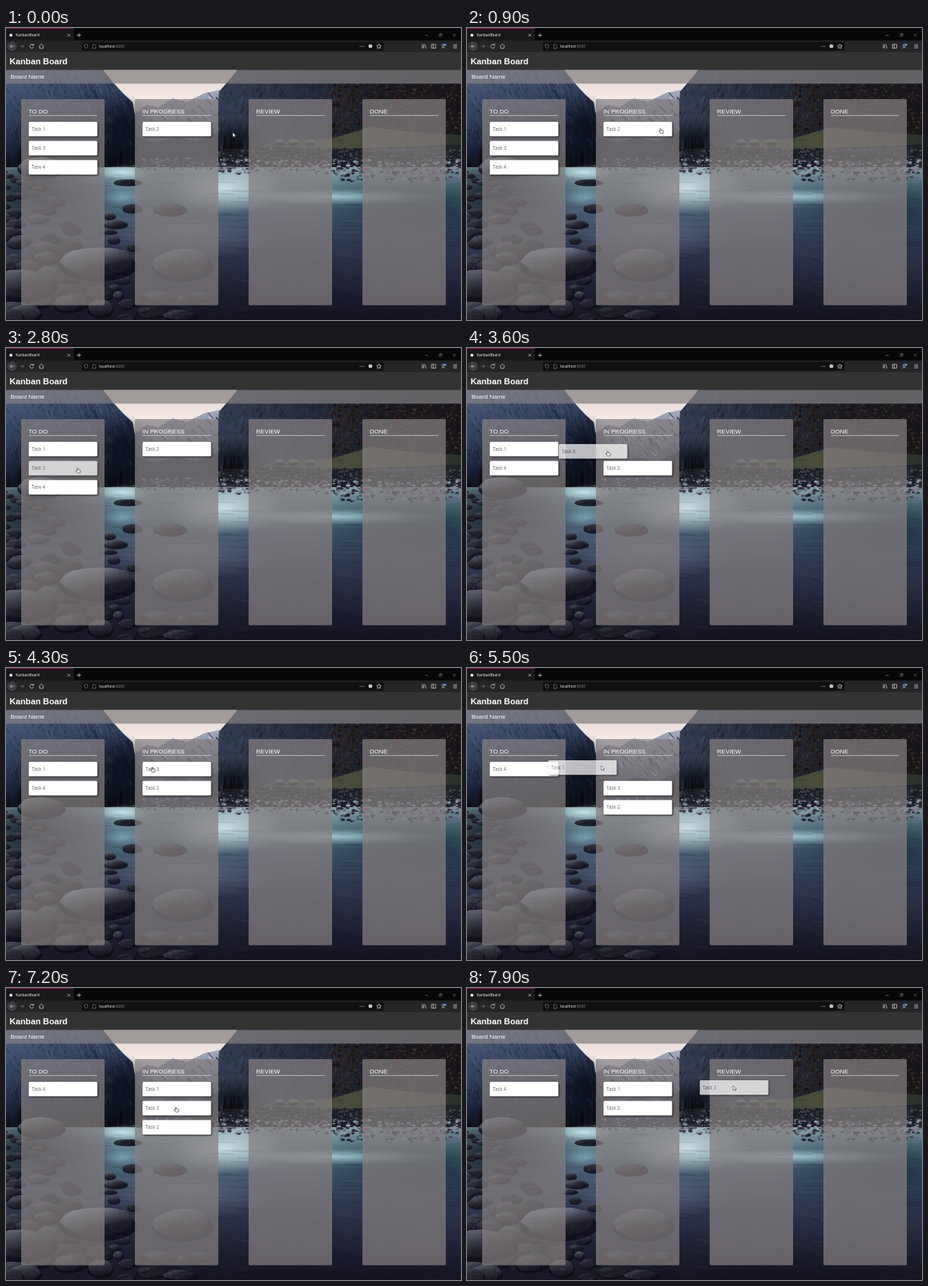
Write an HTML page with a canvas that moves like this. It is 600x386 px and loops after 8 s.

```html
<!DOCTYPE html>
<html lang="en">
<head>
<meta charset="utf-8">
<title>KanbanBoard</title>
<style>
  html, body { margin: 0; width: 100%; height: 100%; overflow: hidden; background: #0b0b0d; }
  canvas, svg { position: absolute; left: 0; top: 0; width: 600px; height: 386px; }
  text { fill: #fff; font-family: "Liberation Sans", Arial, sans-serif; font-size: 8px; }
  .small { font-family: "Open Sans", sans-serif; font-size: 4.9px; }
  .task text { font-family: "Open Sans", sans-serif; font-size: 6.2px; fill: #666; }
  .task { filter: drop-shadow(1.3px 1.5px 1px rgba(0, 0, 0, .75)); }
  .icon { fill: none; stroke: #c6c6c9; stroke-width: .8; }
  .dim { stroke: #88888c; stroke-width: .6; }
</style>
</head>
<body>
<canvas id="photo" width="600" height="386"></canvas>
<svg viewBox="0 0 600 386">
  <rect width="600" height="17" fill="#060607"/>
  <rect width="89.5" height="17" fill="#18181a"/>
  <rect width="89.5" height="1" fill="#8c143c"/>
  <rect y="16.5" width="600" height="16" fill="#242427"/>
  <rect x="100" y="18.5" width="398" height="11.5" rx="1" fill="#101012"/>
  <circle cx="6.5" cy="9.5" r="2" fill="#eee"/>
  <text class="small" x="13" y="11.4">KanbanBoard</text>
  <text class="small" x="123" y="26">localhost<tspan fill="#98989c">:4200</tspan></text>
  <circle cx="8" cy="24.2" r="5.6" fill="#3d3d41" stroke="#606064" stroke-width=".5"/>
  <g class="icon">
    <path d="M81 7.7l3.6 3.6m0-3.6l-3.6 3.6M93.500 9.500h5.400m-2.700-2.700v5.400"/>
    <path d="M5.500 24.200h5m-2.700-2.300l-2.300 2.300 2.300 2.300"/>
    <path class="dim" d="M18.500 24.200h5m-2.300-2.300l2.300 2.300-2.300 2.300"/>
    <path d="M36 22.500a2.600 2.600 0 1 0 .5 2.500m0-4.200v2.200h-2.200"/>
    <path d="M43.400 24.200l3.300-3 3.300 3m-5.500-.2v3h4.400v-3"/>
    <path class="dim" d="M105.500 21.400l2.300.8q0 3.500-2.300 5-2.300-1.500-2.300-5zM114.600 21.500h2.500l1.200 1.300v4.200h-3.700z"/>
    <path d="M466.600 24.200h6" stroke-width="1" stroke-dasharray="1 1.400"/>
    <path d="M491.700 21.200l.9 2 2.200.2-1.700 1.500.5 2.200-1.900-1.200-1.900 1.200.5-2.200-1.700-1.500 2.200-.2z"/>
    <path d="M549 21.500v5.500m1.800-5.500v5.500m1.600-5.400l1.700 5.400M561 21.700h5.600v5h-5.600zm2.300 0v5"/>
    <circle cx="576.500" cy="23" r="1.500"/><path d="M573.800 27q2.700-3.600 5.400 0"/>
    <path d="M589.800 22.300h5m-5 2h5m-5 2h5"/>
    <path class="dim" d="M552.500 9.700h4M571 8.300h2.800v2.800h-2.800zm1 0v-1h2.800v2.800h-1M589.400 7.700l3.600 3.600m0-3.600l-3.600 3.600"/>
  </g>
  <circle cx="480.500" cy="24" r="2.500" fill="#c9c9cc"/>
  <circle cx="579" cy="22" r="1.500" fill="#38a9e8"/>
  <rect y="32" width="600" height="23.500" fill="#333"/>
  <rect y="55.500" width="600" height="18" fill="#858284" opacity=".7"/>
  <text x="4.700" y="48" style="font-size:11.200px;font-weight:700">Kanban Board</text>
  <text x="6" y="67.300">Board Name</text>
  <g id="columns"></g>
  <g id="tasks"></g>
  <g id="arrow"><path transform="scale(.75)" d="M0 0V8.200L1.900 6.500 3.200 9.300 4.500 8.700 3.200 6H5.800Z" fill="#fff" stroke="#222" stroke-width=".7"/></g>
  <g id="hand"><path transform="translate(0 1) scale(.75)" d="M-.9 .8Q0-.6.8.8V3.400L4.200 4.200Q5.300 4.600 5 6L4.300 9H-.5L-3 5.600Q-3.200 4.300-2 4.700L-.9 5.700Z" fill="#fff" stroke="#222" stroke-width=".8"/></g>
</svg>
<script>
const byId = id => document.getElementById(id);
const ctx = byId('photo').getContext('2d');
let seed = 7;
const rnd = (a, b) => {
  seed = (seed * 16807) % 2147483647;
  return a + (b - a) * seed / 2147483647;
};
const times = (n, fn) => { for (let i = 0; i < n; i++) fn(i); };
const grey = (lo, hi, alpha = 1) => {
  const v = rnd(lo, hi);
  return `rgba(${v},${v * 1.03},${v * 1.14 + 4},${alpha})`;
};

// evenly spaced colours from (x0, y0) to (x1, y1)
function ramp(x0, y0, x1, y1, ...colors) {
  const g = ctx.createLinearGradient(x0, y0, x1, y1);
  colors.forEach((c, i) => g.addColorStop(i / (colors.length - 1), c));
  return g;
}
function shape(points, fill) {
  const path = new Path2D(`M${points}Z`);
  ctx.fillStyle = fill;
  ctx.fill(path);
  return path;
}
function blob(x, y, rx, ry, fill) {
  ctx.fillStyle = fill;
  ctx.beginPath();
  ctx.ellipse(x, y, rx, ry, 0, 0, 7);
  ctx.fill();
}
function glow(x, y, rx, ry, rgb, alpha) {
  ctx.save();
  ctx.translate(x, y);
  ctx.scale(rx, ry);
  const g = ctx.createRadialGradient(0, 0, 0, 0, 0, 1);
  g.addColorStop(0, `rgba(${rgb},${alpha})`);
  g.addColorStop(1, `rgba(${rgb},0)`);
  ctx.fillStyle = g;
  ctx.fillRect(-1, -1, 2, 2);
  ctx.restore();
}
// short strokes, dark and light, inside a clip path
function grain(clip, n, [x0, y0, x1, y1], dx, dy, light, alpha) {
  ctx.save();
  if (clip) ctx.clip(clip);
  times(n, i => {
    const x = rnd(x0, x1), y = rnd(y0, y1), k = rnd(.2, 1);
    ctx.strokeStyle = i % 2 ? grey(light * .6, light, alpha) : grey(6, 30, alpha * 1.3);
    ctx.lineWidth = rnd(.4, 1.8);
    ctx.beginPath();
    ctx.moveTo(x, y);
    ctx.lineTo(x + dx * k + rnd(-2, 2), y + dy * k + rnd(-1, 1));
    ctx.stroke();
  });
  ctx.restore();
}
function pebbles(n, [x0, y0, x1, y1], size, lo, hi) {
  times(n, () => {
    const r = rnd(.7, size);
    blob(rnd(x0, x1), rnd(y0, y1), r, r * .6, grey(lo, hi));
  });
}
function rock(x, y, rx, ry, light = 95) {
  blob(x + 1, y + ry * .3, rx * 1.06, ry, 'rgba(10,12,22,.8)');
  const points = [];
  times(16, i => {
    const a = i * Math.PI / 8, k = rnd(.9, 1.05);
    points.push(`${x + Math.cos(a) * rx * k} ${y + Math.sin(a) * ry * k}`);
  });
  const path = shape(points.join('L'), ramp(x, y - ry, x + rx * .2, y + ry,
    grey(light, light + 12), grey(light * .65, light * .7), '#20202b', '#14141e'));
  grain(path, rx * 4, [x - rx, y - ry, x + rx, y + ry], 3, 1, 140, .14);
}

function paintLand() {
  ctx.fillStyle = ramp(0, 55, 0, 130, '#e2d3cd', '#f3eae6', '#c6cbd6');
  ctx.fillRect(0, 32, 600, 160);
  const peaks = shape('140 190L165 116 186 101 200 105 220 93 238 98 262 86 300 78 300 190',
    ramp(0, 84, 0, 165, '#a4a9b7', '#667086', '#232b3f'));
  grain(peaks, 190, [150, 84, 295, 140], 8, 9, 235, .45);
  shape('150 190L168 142 195 152 225 144 250 150 292 132 292 190', '#182031');

  const left = shape('0 32L118 32 130 58 143 74 156 88 167 98 171 122 175 192 0 192',
    ramp(60, 50, 95, 185, '#4b5c7a', '#33435f', '#182136', '#0b1019'));
  grain(left, 700, [0, 50, 170, 150], 6, 13, 128, .24);
  glow(158, 132, 42, 44, '8,13,24', .8);

  const right = shape('316 32L303 58 289 75 281 84 279 114 284 190 600 190 600 32',
    ramp(280, 0, 600, 0, '#333c50', '#272d3b', '#191b24', '#17151a'));
  grain(right, 600, [278, 50, 460, 145], -5, 13, 112, .22);
  glow(300, 146, 50, 28, '8,12,20', .85);

  // autumn slope, meadow and huts
  times(700, () => blob(rnd(430, 600), rnd(74, 140), rnd(.6, 2.6), rnd(.6, 2),
    `hsl(${rnd(-5, 45)},${rnd(10, 32)}%,${rnd(6, 19)}%)`));
  const meadow = shape('318 163L355 150 430 146 480 131 530 137 600 141 600 165 318 165',
    ramp(320, 0, 600, 0, '#383e37', '#494c39', '#2b3029'));
  grain(meadow, 170, [318, 132, 600, 162], 9, 1, 85, .2);
  for (const x of [355, 373, 395]) {
    blob(x + 6, 153, 7, 3, '#22242a');
    shape(`${x - 2} 151L${x + 3} 147 ${x + 10} 147 ${x + 13} 151`, '#65636a');
  }

  // trees at the foot of the cliffs
  times(66, i => {
    const x = i < 46 ? i * 3.8 : rnd(278, 332), y = i < 46 ? 188 : 168;
    const h = rnd(12, 33), w = rnd(2, 5);
    shape(`${x} ${y - h}L${x + w} ${y} ${x - w} ${y}`, grey(8, 25));
  });
  shape('278 162L330 157 440 160 600 154 600 190 278 190', '#1d1f26');
  pebbles(600, [280, 159, 600, 178], 2.1, 16, 85);
}

function paintRiver() {
  ctx.fillStyle = ramp(0, 184, 0, 386, '#88a8b2', '#597985', '#405468', '#313950', '#262a3e', '#1c1d2d', '#171722');
  ctx.fillRect(0, 184, 600, 202);
  glow(40, 215, 110, 60, '14,20,32', .95);
  glow(555, 240, 170, 70, '14,36,50', .75);
  glow(290, 212, 85, 34, '216,232,235', .9);
  glow(155, 191, 38, 10, '200,228,232', .95);
  glow(155, 224, 30, 11, '130,175,188', .7);
  glow(425, 223, 150, 11, '172,212,218', .85);
  glow(240, 272, 120, 34, '140,145,162', .4);
  grain(null, 420, [-30, 192, 600, 290], 55, 1, 190, .08);
  grain(null, 420, [-30, 285, 600, 386], 38, 8, 125, .08);
  pebbles(480, [278, 174, 600, 193], 3, 30, 160);
  pebbles(120, [430, 186, 600, 203], 3.2, 22, 130);
  pebbles(140, [168, 172, 285, 187], 2.2, 30, 120);
}

function paintRocks() {
  // boulders on the left bank grow towards the viewer
  times(70, i => {
    const depth = i / 70, size = 5 + depth * 19;
    rock(rnd(-10, 62 + depth * 75), 184 + depth * 200, size * rnd(.7, 1.2), size * .48, rnd(38, 82));
  });
  times(13, i => rock(rnd(132, 172), 238 + i * 10.5, rnd(6, 15), rnd(3, 6), rnd(42, 85)));
  times(12, () => rock(rnd(150, 300), rnd(345, 385), rnd(8, 22), rnd(3, 8), rnd(35, 60)));
  rock(46, 183, 30, 13, 105);
  rock(160, 204, 18, 4, 38);
  rock(216, 239, 21, 8, 75);
  rock(120, 309, 49, 20, 120);
  rock(232, 311, 38, 19, 98);
  rock(20, 338, 44, 19, 90);
  glow(420, 420, 320, 75, '13,13,24', .75);
}
paintLand();
paintRiver();
paintRocks();

const columnX = col => 20 + col * 150;
byId('columns').innerHTML = ['TO DO', 'IN PROGRESS', 'REVIEW', 'DONE'].map((name, col) =>
  `<g transform="translate(${columnX(col)} 94)">
    <rect width="110" height="272.500" rx="1.500" fill="#868082" opacity=".72"/>
    <text x="9.800" y="18.600">${name}</text>
    <path d="M10 21.700h90" stroke="#ddd" stroke-width=".7"/></g>`).join('');
byId('tasks').innerHTML = [1, 2, 3, 4].map(id =>
  `<g class="task" id="task${id}"><rect width="90.500" height="19.200" rx="1.500" fill="#fff"/>
    <text x="4" y="11.900">Task ${id}</text></g>`).join('');

// each drag: grip on the card, a point on the way at time `via`, then where the pointer rests
const drags = [
  { id: 3, col: 1, from: 2700, to: 3900, grip: [64.5, 8], via: [3600, 185.5, 135], rest: [4300, 193, 130], hand: true },
  { id: 1, col: 1, from: 4900, to: 6000, grip: [70, 7], via: [5500, 177, 129], rest: [6600, 229, 156] },
  { id: 3, col: 2, from: 7300, to: 8300, grip: [44, 7], via: [7900, 351, 129], rest: [8100, 351, 129] }
];
const LOOP = 8000, STEP = 100, DROP = 250;
const path = [[0, 299, 138], [400, 299, 138], [1500, 198, 123], [1800, 198, 123]];

function pointerAt(t) {
  const i = path.findIndex(stop => stop[0] > t);
  const [t0, x0, y0] = path[i - 1], [t1, x1, y1] = path[i];
  const p = (t - t0) / (t1 - t0), k = p * p * (3 - 2 * p);
  return [x0 + (x1 - x0) * k, y0 + (y1 - y0) * k];
}
function slotsAt(t) {
  const lists = [[1, 3, 4], [2], []], slots = {};
  for (const d of drags.filter(d => d.enter <= t)) {
    for (const list of lists) if (list.includes(d.id)) list.splice(list.indexOf(d.id), 1);
    lists[d.col].unshift(d.id);
  }
  lists.forEach((list, col) => list.forEach((id, row) =>
    slots[id] = [columnX(col) + 10, 124 + row * 25.3]));
  return slots;
}
// the card changes lists once the pointer is over the new column
for (const d of drags) {
  const [x, y] = slotsAt(d.from)[d.id];
  const grab = [x + d.grip[0], y + d.grip[1]];
  const last = path[path.length - 1];
  if (last[0] < d.from - 500) path.push([d.from - 500, last[1], last[2]]);
  path.push([d.from - 50, ...grab], [d.from + 100, ...grab], d.via, d.rest);
  d.enter = d.from + STEP;
  while (pointerAt(d.enter)[0] < columnX(d.col)) d.enter += STEP;
}

const place = (node, [x, y]) => node.setAttribute('transform', `translate(${x} ${y})`);
const show = (node, on) => node.style.display = on ? '' : 'none';

function draw(t) {
  const pos = slotsAt(t), tip = pointerAt(t);
  const drag = drags.find(d => t >= d.from && t < d.to + DROP);
  const held = drag && t < drag.to;
  if (drag) {
    const grabbed = pointerAt(Math.min(t, drag.to));
    const left = held ? 1 : (1 - (t - drag.to) / DROP) ** 3;
    pos[drag.id] = pos[drag.id].map((home, i) => home + (grabbed[i] - drag.grip[i] - home) * left);
  }
  for (const id in pos) {
    const card = byId('task' + id), lifted = drag && drag.id === +id;
    place(card, pos[id]);
    card.style.opacity = lifted ? .72 : 1;
    if (lifted && card.nextSibling) byId('tasks').append(card);
  }
  const over = Object.values(pos).some(([x, y]) =>
    tip[0] >= x && tip[0] <= x + 90.5 && tip[1] >= y - 2 && tip[1] <= y + 19.2);
  const hand = held ? drag.hand : over;
  show(byId('hand'), hand);
  show(byId('arrow'), !hand);
  place(byId('hand'), tip);
  place(byId('arrow'), tip);
}

const start = performance.now();
function tick() {
  const t = (performance.now() - start) % LOOP;
  draw(Math.floor(t / STEP) * STEP);
  requestAnimationFrame(tick);
}
tick();
</script>
</body>
</html>
```
